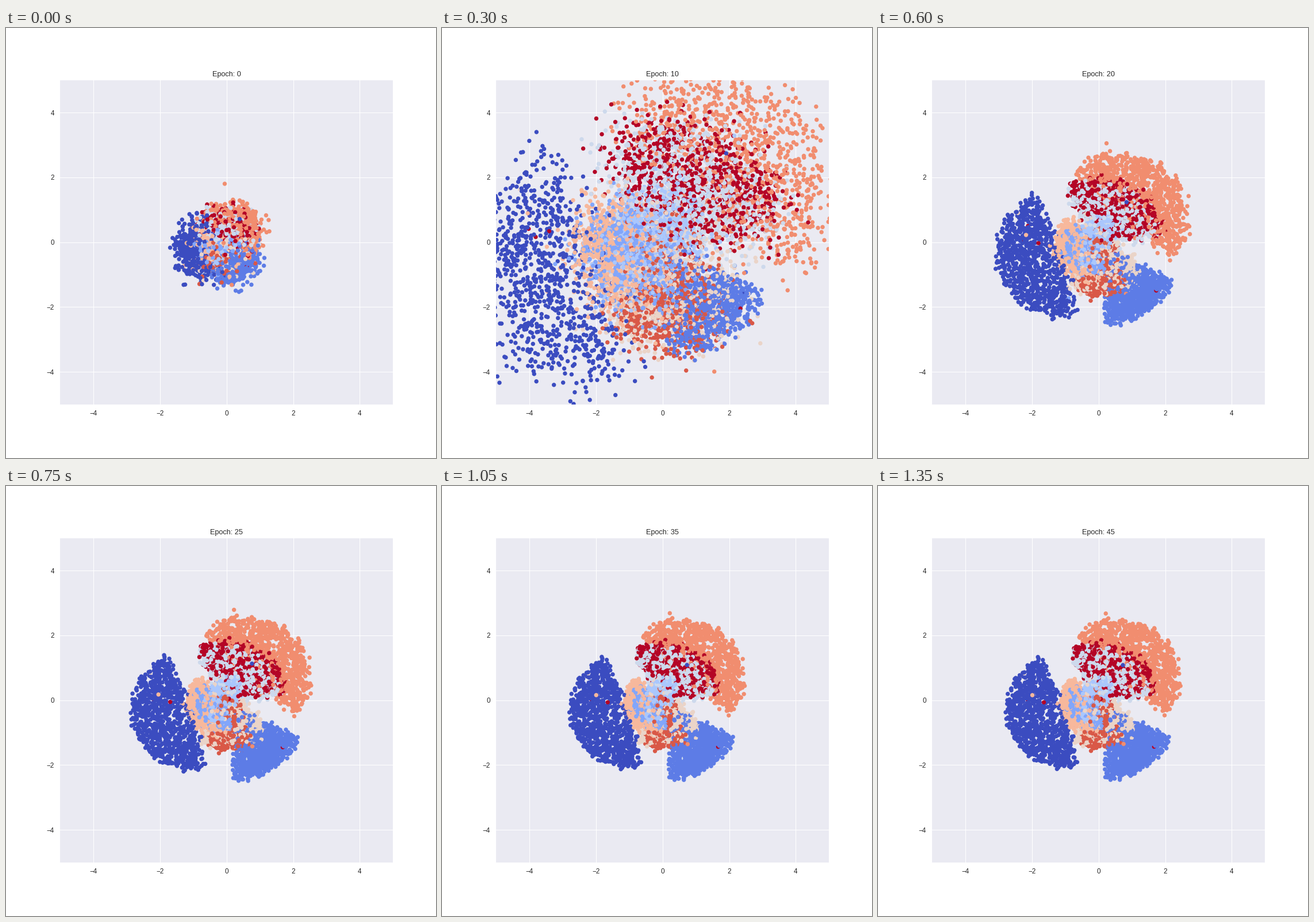
Animation, 748 px wide and 748 px high, one loop 1500 ms. Source, as a matplotlib script:

```python
import numpy as np
import matplotlib.pyplot as plt
from matplotlib.animation import FuncAnimation

SIZE, DPI = 748, 68
POINTS, STEPS, EPOCHS_PER_STEP = 10000, 10, 5
INK = "0.15"

plt.rcParams["font.family"] = "Liberation Sans"

# A fan per class: heading, apex distance from the origin, half angle, reach.
FANS = np.array([
    (197, 1.1, 85, 1.7),
    (-56, .45, 34, 2),
    (215, 0, 60, .9),
    (150, -.25, 80, .8),
    (62, 0, 55, 1.6),
    (282, -.9, 25, 2.25),
    (205, .2, 75, .9),
    (48, .9, 85, 1.8),
    (275, -.6, 18, 2),
    (62, 0, 55, 1.75),
])
GIVE = np.ones(len(FANS))  # how far each class follows the burst
GIVE[1] = .35

rng = np.random.default_rng(7)
label = rng.integers(0, len(FANS), POINTS)
stray = rng.random(POINTS) < .006
home = np.where(stray, rng.integers(0, len(FANS), POINTS), label)
noise = rng.normal(size=(2, POINTS))


def polar(radius, degrees):
    a = np.radians(degrees)
    return radius * np.array([np.cos(a), np.sin(a)])


heading, apex, half, reach = FANS[home].T
base = polar(apex, heading) + polar(
    reach * rng.random(POINTS) ** .45,
    heading + half * rng.uniform(-1, 1, POINTS))


def start():
    """A small, mixed ball."""
    return .36 * base + .26 * noise - [[.15], [.03]]


def stretch():
    """The fans sheared into one long, bent band."""
    x, y = base
    along = 1.25 * x + .3 * y + .4 * noise[0]
    along = np.where(along < 0, 1.3 * along, along)
    bend = -.1 + .25 * along + .03 * along ** 2
    across = .3 * y + .4 * (np.hypot(x, y) - 1.4) + .2 * noise[1]
    return np.array([along, bend + across])


def settle(epoch):
    """A wide burst that decays onto the fans."""
    growth = np.exp(-(epoch - 10) / 4.2) * GIVE[home]
    return (1 + growth) * base + (.07 + .45 * growth) * noise


def cloud(i):
    if i == 0:
        return start().T
    if i == 1:
        return stretch().T
    return settle(i * EPOCHS_PER_STEP).T


fig = plt.figure(figsize=(SIZE / DPI, SIZE / DPI), dpi=DPI, facecolor="white")
left, right, top, bottom = 94.3, 673.2, 90.8, 654.6
ax = fig.add_axes([left / SIZE, 1 - bottom / SIZE,
                   (right - left) / SIZE, (bottom - top) / SIZE])
ax.set(xlim=(-5, 5), ylim=(-5, 5), facecolor="#eaeaf2",
       xticks=range(-4, 5, 2), yticks=range(-4, 5, 2))
ax.set_axisbelow(True)
ax.grid(color="white", linewidth=1.1)
ax.spines[:].set_visible(False)
ax.tick_params(length=0, labelsize=12.3, labelcolor=INK, pad=10.8)
title = ax.set_title("Epoch: 0", fontsize=13.4, color=INK, pad=7.6)
dots = ax.scatter(*cloud(0).T, c=label, cmap="coolwarm", vmin=0,
                  vmax=len(FANS) - 1, s=61, linewidths=0)


def update(i):
    dots.set_offsets(cloud(i))
    title.set_text(f"Epoch: {EPOCHS_PER_STEP * i}")
    return dots, title


anim = FuncAnimation(fig, update, frames=STEPS, interval=150,
                     repeat=True, repeat_delay=0)
plt.show()
```
